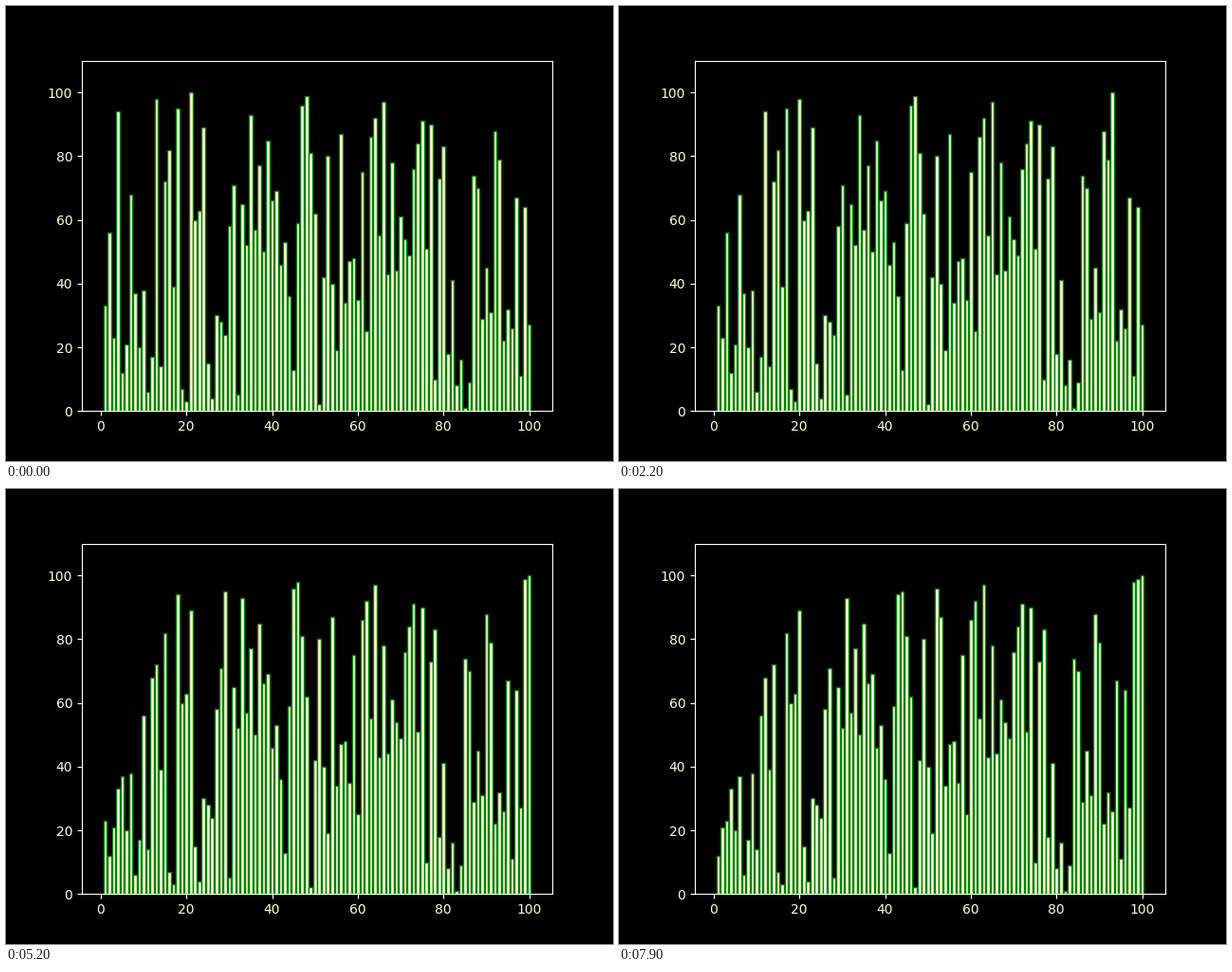
These frames come from a looping animation (640 px wide and 480 px high, 8 s). A matplotlib script:

```python
import matplotlib.pyplot as plt
from matplotlib.animation import FuncAnimation

FRAMES = 80
INTERVAL = 100
SWAPS_PER_FRAME = 4
CREAM = "#ffffcc"

START = [
    33, 56, 23, 94, 12, 21, 68, 37, 20, 38,
    6, 17, 98, 14, 72, 82, 39, 95, 7, 3,
    100, 60, 63, 89, 15, 4, 30, 28, 24, 58,
    71, 5, 65, 52, 93, 57, 77, 50, 85, 66,
    69, 46, 53, 36, 13, 59, 96, 99, 81, 62,
    2, 42, 80, 40, 19, 87, 34, 47, 48, 35,
    75, 25, 86, 92, 55, 97, 43, 78, 44, 61,
    54, 49, 76, 84, 91, 51, 90, 10, 73, 83,
    18, 41, 8, 16, 1, 9, 74, 70, 29, 45,
    31, 88, 79, 22, 32, 26, 67, 11, 64, 27,
]


def bubble_states(values):
    """Yield the list before sorting and after every swap."""
    a = list(values)
    yield a[:]
    for end in range(len(a) - 1, 0, -1):
        for j in range(end):
            if a[j] > a[j + 1]:
                a[j], a[j + 1] = a[j + 1], a[j]
                yield a[:]


states = list(bubble_states(START))[::SWAPS_PER_FRAME][:FRAMES]

plt.style.use("dark_background")
fig, ax = plt.subplots(figsize=(6.4, 4.8), dpi=100)
bars = ax.bar(range(1, len(START) + 1), START,
              color="lightyellow", edgecolor="green")
ax.set_ylim(0, 110)
ax.tick_params(labelcolor=CREAM)


def update(frame):
    for bar, height in zip(bars, states[frame]):
        bar.set_height(height)
    return bars.patches


anim = FuncAnimation(fig, update, frames=FRAMES, interval=INTERVAL,
                     repeat=True, repeat_delay=0, blit=False)
plt.show()
```
